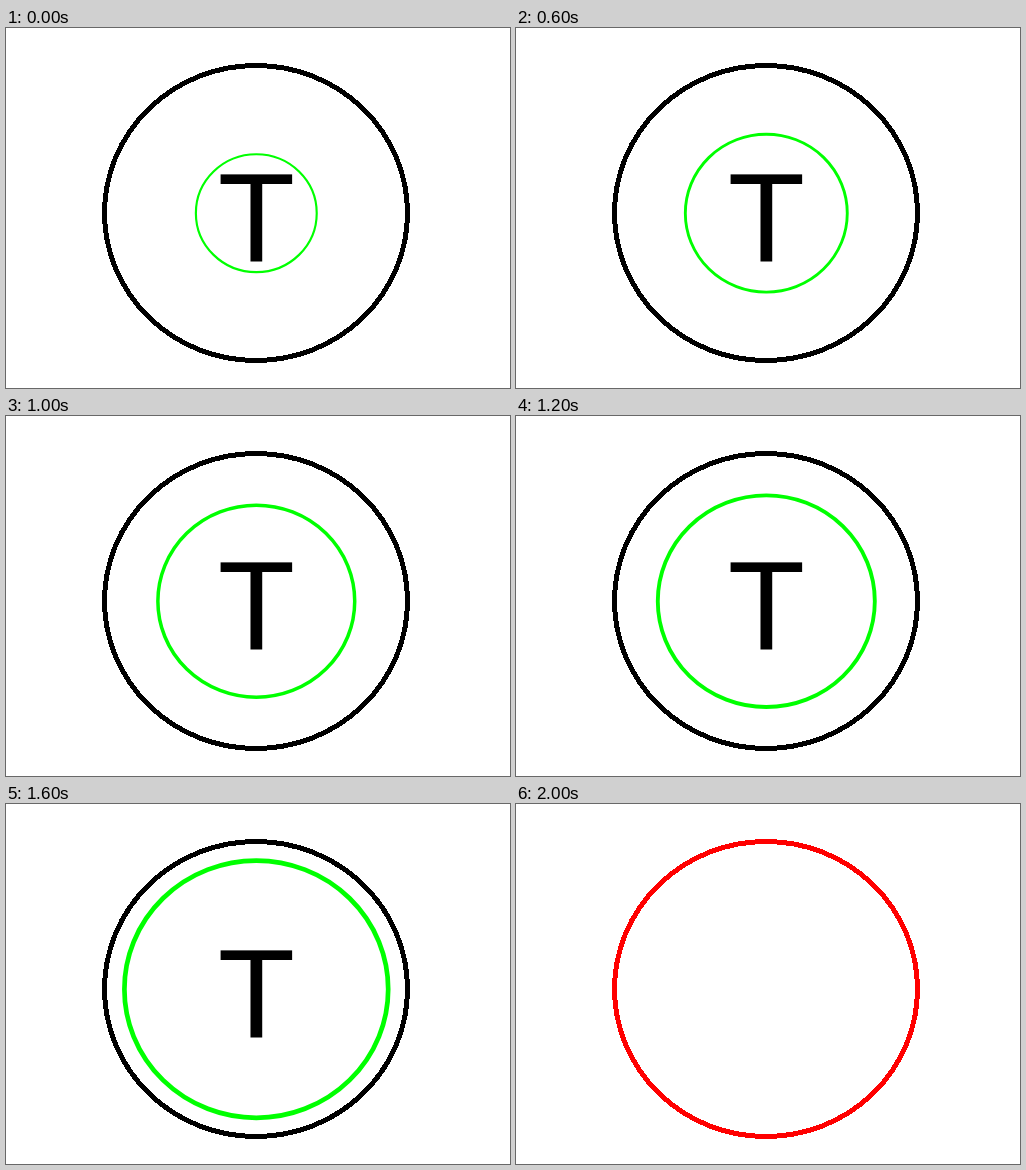
Write an HTML page that moves like this. It is 504 px wide and 360 px high and loops after 2500 ms.

```html
<!DOCTYPE html>
<html lang="en">
<head>
<meta charset="utf-8">
<title>Closing ring</title>
<style>
  html, body { margin: 0; width: 100%; height: 100%; overflow: hidden; background: #fff; }
  svg { display: block; }
  ellipse { fill: none; }
  text { font: 126.5px "Liberation Sans", Arial, sans-serif; text-anchor: middle; }
</style>
</head>
<body>
<svg width="504" height="360" viewBox="0 0 504 360">
  <ellipse id="pulse" cx="250.3" cy="185.2" stroke="#0f0"/>
  <ellipse id="ring" cx="250" cy="185" rx="151.5" ry="147.5" stroke-width="5" shape-rendering="crispEdges"/>
  <text id="key" x="250.5" y="233">T</text>
</svg>
<script>
  const LOOP = 2500, STEP = 100, HIT = 19, MISS = 20, GROWTH = 1.05;
  const [pulse, ring, key] = ["pulse", "ring", "key"].map(id => document.getElementById(id));
  const start = performance.now();

  function draw(step) {
    const scale = GROWTH ** step;
    const stroke = 2.15 * scale;
    pulse.setAttribute("rx", 61.5 * scale - stroke / 2);
    pulse.setAttribute("ry", 60 * scale - stroke / 2);
    pulse.setAttribute("stroke-width", stroke);

    // The pulse meets the ring on HIT, then the ring turns red on MISS.
    pulse.style.display = step < HIT ? "" : "none";
    ring.style.stroke = step < HIT ? "#000" : step < MISS ? "#0f0" : "#f00";
    key.style.display = step < MISS ? "" : "none";
  }

  function tick() {
    const time = Math.max(0, performance.now() - start) % LOOP;
    draw(Math.min(MISS, Math.floor(time / STEP)));
    requestAnimationFrame(tick);
  }
  tick();
</script>
</body>
</html>
```
